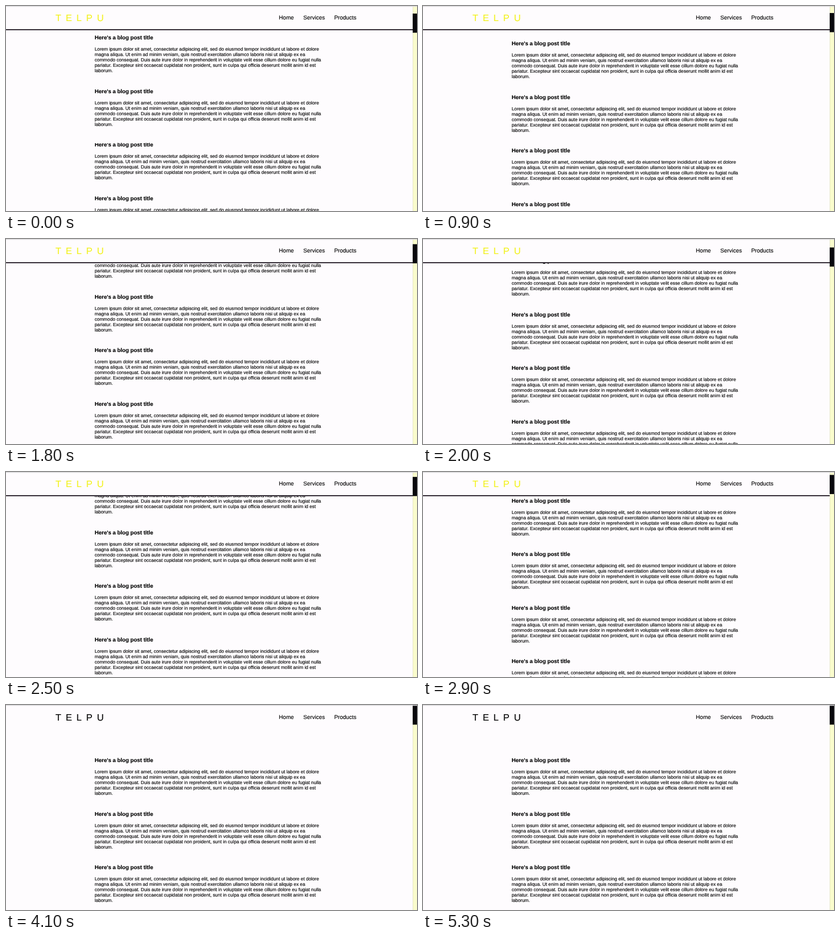
Write an HTML page that moves like this. It is 760x381 px and loops after 5.9 s.

```html
<!DOCTYPE html>
<html lang="en">
<head>
<meta charset="utf-8">
<title>Sticky navigation</title>
<style>
  html, body { margin: 0; width: 100%; height: 100%; overflow: hidden; background: #fefcfe; }
  svg { display: block; width: 760px; height: 381px; }
  text {
    font: 8.67px "Liberation Sans", Arial, sans-serif; white-space: pre; text-rendering: geometricPrecision;
    color: #040404; fill: currentColor; stroke: currentColor; stroke-width: .15px;
  }
  .title { font-size: 10.15px; font-weight: bold; }
  .logo { font-size: 17.34px; letter-spacing: 8.4px; }
  .link { font-size: 10.4px; }
  .bar { visibility: hidden; }
  .sticky .bar { visibility: visible; }
  .sticky .logo { color: #f2f222; }
  .sticky .labels { transform: translateY(-.7px); }
</style>
</head>
<body>
<svg viewBox="0 0 760 381">
  <g id="posts"></g>
  <g id="nav">
    <g class="bar">
      <rect width="752" height="44" fill="#fefcfe"/>
      <rect y="43.2" width="752" height="1.8" fill="#150d18"/>
    </g>
    <g class="labels">
      <text class="logo" x="91.4" y="28.8">TELPU</text>
      <text class="link" x="504.6" y="26.1">Home</text>
      <text class="link" x="549.8" y="26.1">Services</text>
      <text class="link" x="606.9" y="26.1">Products</text>
    </g>
  </g>
  <rect x="752" width="8" height="381" fill="#fafccc"/>
  <rect x="752" width="1" height="381" fill="#e6e7c4"/>
  <rect id="thumb" x="752" width="8" height="35.6" fill="#08080c"/>
  <rect width="760" height="1.4" fill="#d9d8da"/>
</svg>
<script>
  const LOOP = 5900, STEP = 100, STICKY_AT = 34, POST_GAP = 99.6;
  const THUMB_TOP = 0.9, THUMB_RATIO = 10.9;
  const LINES = [
    'Lorem ipsum dolor sit amet, consectetur adipiscing elit, sed do eiusmod tempor incididunt ut labore et dolore',
    'magna aliqua. Ut enim ad minim veniam, quis nostrud exercitation ullamco laboris nisi ut aliquip ex ea',
    'commodo consequat. Duis aute irure dolor in reprehenderit in voluptate velit esse cillum dolore eu fugiat nulla',
    'pariatur. Excepteur sint occaecat cupidatat non proident, sunt in culpa qui officia deserunt mollit anim id est',
    'laborum.'
  ];
  // Scroll offset over time: [ms, px]
  const SCROLL = [
    [0, 143.3], [800, 143.3], [1100, 84], [1450, 14], [1600, 26.8], [1800, 95], [2000, 161.4],
    [2080, 165], [2500, 89.8], [2900, 49.4], [3200, 22], [3750, 0], [LOOP, 0]
  ];

  const posts = document.getElementById('posts');
  const nav = document.getElementById('nav');
  const thumb = document.getElementById('thumb');

  const line = (y, str, cls = '') => `<text class="${cls}" x="164" y="${y}">${str}</text>`;
  const post = (_, i) => `<g transform="translate(0 ${i * POST_GAP})">` +
    line(106, "Here's a blog post title", 'title') +
    LINES.map((str, n) => line(127 + n * 9.98, str)).join('') + '</g>';
  posts.innerHTML = Array.from({ length: 6 }, post).join('');

  const slope = (a, b) => (b[1] - a[1]) / (b[0] - a[0]);

  // Harmonic mean of the neighbouring slopes, flat at turning points
  function tangent(i) {
    if (i === 0 || i === SCROLL.length - 1) return 0;
    const a = slope(SCROLL[i - 1], SCROLL[i]), b = slope(SCROLL[i], SCROLL[i + 1]);
    return a * b > 0 ? 2 * a * b / (a + b) : 0;
  }

  function scrollAt(t) {
    const i = SCROLL.findIndex(p => p[0] > t) - 1;
    const [t0, s0] = SCROLL[i], [t1, s1] = SCROLL[i + 1];
    const d = t1 - t0, u = (t - t0) / d, v = 1 - u;
    return v * v * ((1 + 2 * u) * s0 + u * d * tangent(i)) +
           u * u * ((3 - 2 * u) * s1 - v * d * tangent(i + 1));
  }

  const start = performance.now();
  function draw(now) {
    const t = Math.max(0, now - start) % LOOP;
    const s = scrollAt(Math.floor(t / STEP) * STEP);
    posts.setAttribute('transform', `translate(0 ${-s})`);
    thumb.setAttribute('y', THUMB_TOP + s / THUMB_RATIO);
    nav.classList.toggle('sticky', s > STICKY_AT);
    requestAnimationFrame(draw);
  }
  draw(start);
</script>
</body>
</html>
```
